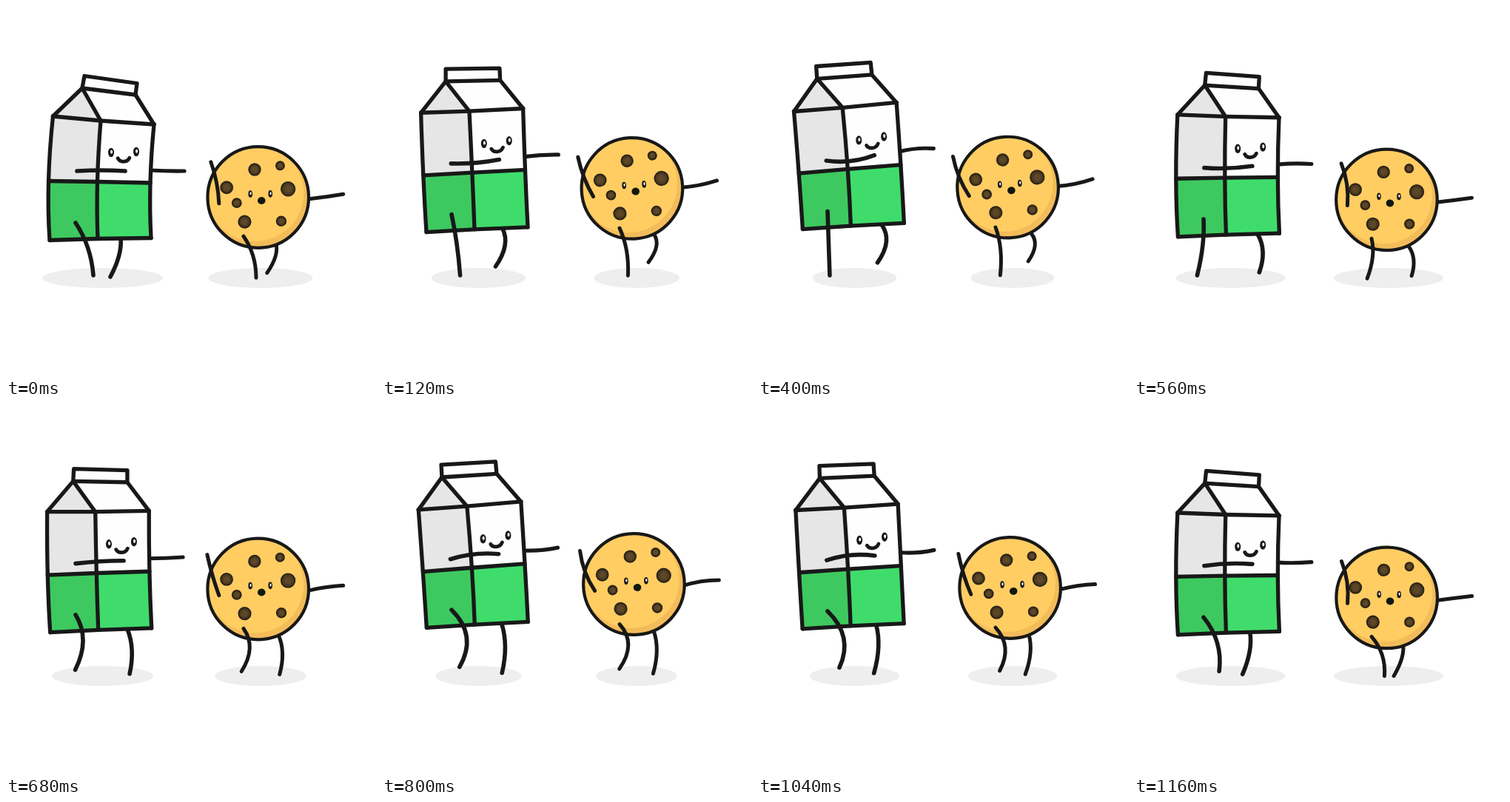
Write an HTML page with a canvas that moves like this. It is 500x500 px and loops after 1.2 s.

```html
<!DOCTYPE html>
<html lang="en">
<head>
<meta charset="utf-8">
<title>Milk and cookie</title>
<style>
  html, body { margin: 0; width: 100%; height: 100%; overflow: hidden; background: #fff; }
  canvas { display: block; width: 100vw; height: 100vh; }
</style>
</head>
<body>
<canvas id="stage"></canvas>
<script>
const LOOP = 1200, BEAT = 600, STEP = 40;
const INK = '#181818';
const canvas = document.getElementById('stage');
const g = canvas.getContext('2d');

// Carton at its lowest point; bendPoint() moves it from there.
const carton = {
  capL: [106, 94.5], capR: [177, 104.5],
  peakL: [103, 111], peakR: [175, 120],
  topL: [63.5, 149], topM: [128, 155], topR: [200, 160],
  midL: [57.5, 236.5], midM: [123.5, 237.5], midR: [195, 239],
  lowL: [59, 316.5], lowM: [124, 314.5], lowR: [196, 313.5]
};
const face = { eyeL: [142, 198], eyeR: [176, 197], smile: [159, 208] };
const arms = { handL: [96, 223], elbowL: [161, 223], armR: [195, 222], handR: [241, 223] };

// Chips on the cookie: x, y, radius.
const chips = [
  [-4.5, -37.5, 7.8], [30, -42.5, 5.6], [-42.5, -13.5, 8], [40.5, -11, 9.3],
  [-29, 7.5, 6], [-18.5, 33, 8.2], [31, 32.5, 6.3]
];

// sway moves the hip and swing the foot with the stride; the rest scale with the rise.
const milkLegs = {
  front: { hip: [94, 293], hop: 17, sway: 0, foot: [99, 364], swing: 19,
    stand: { lift: 0, out: 0, hip: 0, bend: -5 }, air: { lift: 10, out: 9, hip: 0, bend: 12 } },
  back: { hip: [161, 314], hop: 20, sway: -6, foot: [157, 366], swing: -16,
    stand: { lift: 3, out: 4, hip: 0, bend: 0 }, air: { lift: 21, out: 3, hip: 6, bend: 5 } }
};
const cookieLegs = {
  front: { hip: [321, 317], hop: 21, sway: 0, foot: [327, 369], swing: 14,
    stand: { lift: 6, out: 3, hip: 0, bend: -1 }, air: { lift: 12, out: -6, hip: 0, bend: 8 } },
  back: { hip: [367, 327], hop: 22, sway: -4, foot: [363, 368], swing: -14,
    stand: { lift: 4, out: 3, hip: 0, bend: 0 }, air: { lift: 27, out: 0, hip: 2.5, bend: 2.5 } }
};

// One hop per beat; swing is +1 in the middle of the first hop, -1 in the second.
function hop(t, power) {
  const p = t / BEAT * Math.PI, swing = Math.sin(p);
  const rise = Math.abs(swing) ** power;
  return {
    swing,
    rise: rise * (1 + .03 * swing),
    stride: Math.sign(Math.cos(p)) * (1 - rise)
  };
}

// The carton curves backwards, more so towards its top, as it rises.
function bendPoint([x, y], u) {
  const h = 316 - y;
  return [
    x + u * (1.5 - .00064 * h * h),
    y - u * (19 + (x - 126) * (.04 + .0009 * h))
  ];
}

function bendAll(points, u) {
  const out = {};
  for (const name in points) out[name] = bendPoint(points[name], u);
  return out;
}

const half = (a, b) => [(a[0] + b[0]) / 2, (a[1] + b[1]) / 2];
const control = (a, m, b) => [2 * m[0] - (a[0] + b[0]) / 2, 2 * m[1] - (a[1] + b[1]) / 2];

function ink(width) {
  g.strokeStyle = INK;
  g.lineWidth = width;
  g.stroke();
}

function oval(x, y, rx, ry, fill) {
  g.beginPath();
  g.ellipse(x, y, rx, ry, 0, 0, Math.PI * 2);
  g.fillStyle = fill;
  g.fill();
}

function through(a, m, b, width) {
  g.beginPath();
  g.moveTo(...a);
  g.quadraticCurveTo(...control(a, m, b), ...b);
  ink(width);
}

function leg(spec, move, inAir, width) {
  const { rise, stride } = move;
  const act = inAir ? spec.air : spec.stand;
  const hip = [
    spec.hip[0] + spec.sway * stride + act.hip * rise,
    spec.hip[1] - spec.hop * rise
  ];
  const foot = [
    spec.foot[0] + spec.swing * stride + act.out * rise,
    spec.foot[1] - act.lift * rise
  ];
  const m = half(hip, foot);
  through(hip, [m[0] + 4.5 + act.bend * rise, m[1] - 2], foot, width);
}

function arm(a, b, bend, width) {
  const dx = b[0] - a[0], dy = b[1] - a[1], len = Math.hypot(dx, dy);
  const m = half(a, b);
  through(a, [m[0] - dy / len * bend, m[1] + dx / len * bend], b, width);
}

function shape(points, fill) {
  g.beginPath();
  points.forEach(p => g.lineTo(...p));
  g.closePath();
  g.fillStyle = fill;
  g.fill();
}

function line(...points) {
  g.beginPath();
  points.forEach(p => g.lineTo(...p));
  ink(5.3);
}

// Half a panel between two bowed edges, above or below the label line.
function panel(p, left, right, lower, fill) {
  const edge = side => {
    const a = p['top' + side], m = p['mid' + side], b = p['low' + side];
    const c = control(a, m, b);
    return lower ? [m, half(c, b), b] : [a, half(a, c), m];
  };
  const l = edge(left), r = edge(right);
  g.beginPath();
  g.moveTo(...l[0]);
  g.quadraticCurveTo(...l[1], ...l[2]);
  g.lineTo(...r[2]);
  g.quadraticCurveTo(...r[1], ...r[0]);
  g.closePath();
  g.fillStyle = fill;
  g.fill();
}

function eye(x, y, rx, ry) {
  oval(x, y, rx, ry, INK);
  oval(x + rx * .15, y - ry * .15, rx * .38, ry * .42, '#fff');
}

function drawMilk(t) {
  const move = hop(t, .8), u = move.rise;
  const p = bendAll(carton, u), a = bendAll(arms, u), f = bendAll(face, u * .85);
  const flex = Math.sin((t - 40) / BEAT * Math.PI);
  const inAir = move.swing < 0;

  oval(130.5, 367.5, 81.5 - 27 * u, 13.5, '#eee');
  leg(milkLegs.back, move, !inAir, 5.6);
  arm(a.armR, a.handR, -2 * flex, 5.2);

  panel(p, 'L', 'M', false, '#e6e6e6');
  panel(p, 'M', 'R', false, '#fefefe');
  panel(p, 'L', 'M', true, '#3dc95f');
  panel(p, 'M', 'R', true, '#3fdc6c');
  shape([p.topL, p.peakL, p.topM], '#e6e6e6');
  shape([p.peakL, p.peakR, p.topR, p.topM], '#fefefe');
  shape([p.capL, p.capR, p.peakR, p.peakL], '#fefefe');

  for (const s of 'LMR') through(p['top' + s], p['mid' + s], p['low' + s], 5.3);
  for (const row of ['top', 'mid', 'low']) line(p[row + 'L'], p[row + 'M'], p[row + 'R']);
  line(p.topL, p.peakL, p.topM);
  line(p.peakL, p.capL, p.capR, p.peakR, p.topR);
  line(p.peakL, p.peakR);

  eye(...f.eyeL, 4, 6.2);
  eye(...f.eyeR, 4, 6.2);
  const [x, y] = f.smile, tilt = (f.eyeR[1] - f.eyeL[1]) / 4;
  g.beginPath();
  g.moveTo(x - 7.8, y - 2.5 - tilt);
  g.bezierCurveTo(x - 5, y + 3.8, x + 5, y + 3.8, x + 7.8, y - 2.5 + tilt);
  ink(4.8);

  leg(milkLegs.front, move, inAir, 5.6);
  arm(a.handL, a.elbowL, 4.5 * flex, 5.6);
}

function drawCookie(t) {
  const move = hop(t + 30, .7), v = move.rise, s = move.swing;
  const inAir = s < 0;

  // Runs a drawing step in the cookie's own moving frame.
  const onBody = paint => {
    g.save();
    g.translate(342 - 3.5 * v - 1.8 * s, 264.8 - 23 * v);
    g.rotate((1 - 4 * v - 1.8 * s) * Math.PI / 180);
    paint();
    g.restore();
  };

  oval(344, 367.5, 77 - 24 * v, 13.5, '#eee');
  leg(cookieLegs.back, move, !inAir, 5);
  onBody(() => {
    arm([67, 3], [115, -3.5], 2 * s, 5);
    oval(0, 0, 68.3, 68.3, '#f3bc5a');
    g.save();
    g.clip();
    oval(-4, -6, 65.5, 65.5, '#ffcd62');
    g.restore();
    g.beginPath();
    g.arc(0, 0, 68.3, 0, Math.PI * 2);
    ink(4.2);
    for (const [x, y, r] of chips) {
      oval(x, y, r + .9, r + .9, '#2c2318');
      oval(x, y, r - 1.2, r - 1.2, '#4d3b20');
      oval(x, y, r * .55, r * .55, '#5c4727');
    }
    eye(-10.5, -4.5, 2.8, 4.8);
    eye(16.5, -4.5, 2.8, 4.8);
    oval(4.5, 4.5, 5.3, 5, '#10170d');
  });
  leg(cookieLegs.front, move, inAir, 5);
  onBody(() => arm([-60 - 13 * v, -49 + 3 * v], [-53, 8], 8.5 * v - 4.5, 5));
}

function draw(now) {
  const t = Math.floor((now % LOOP) / STEP) * STEP;
  const w = Math.round(innerWidth * devicePixelRatio);
  const h = Math.round(innerHeight * devicePixelRatio);
  if (canvas.width !== w || canvas.height !== h) {
    canvas.width = w;
    canvas.height = h;
  }
  g.setTransform(w / 500, 0, 0, h / 500, 0, 0);
  g.fillStyle = '#fff';
  g.fillRect(0, 0, 500, 500);
  g.lineCap = g.lineJoin = 'round';
  drawMilk(t);
  drawCookie(t);
}

let start = null;
function tick(now) {
  if (start === null) start = now;
  draw(now - start);
  requestAnimationFrame(tick);
}
draw(0);
requestAnimationFrame(tick);
</script>
</body>
</html>
```
